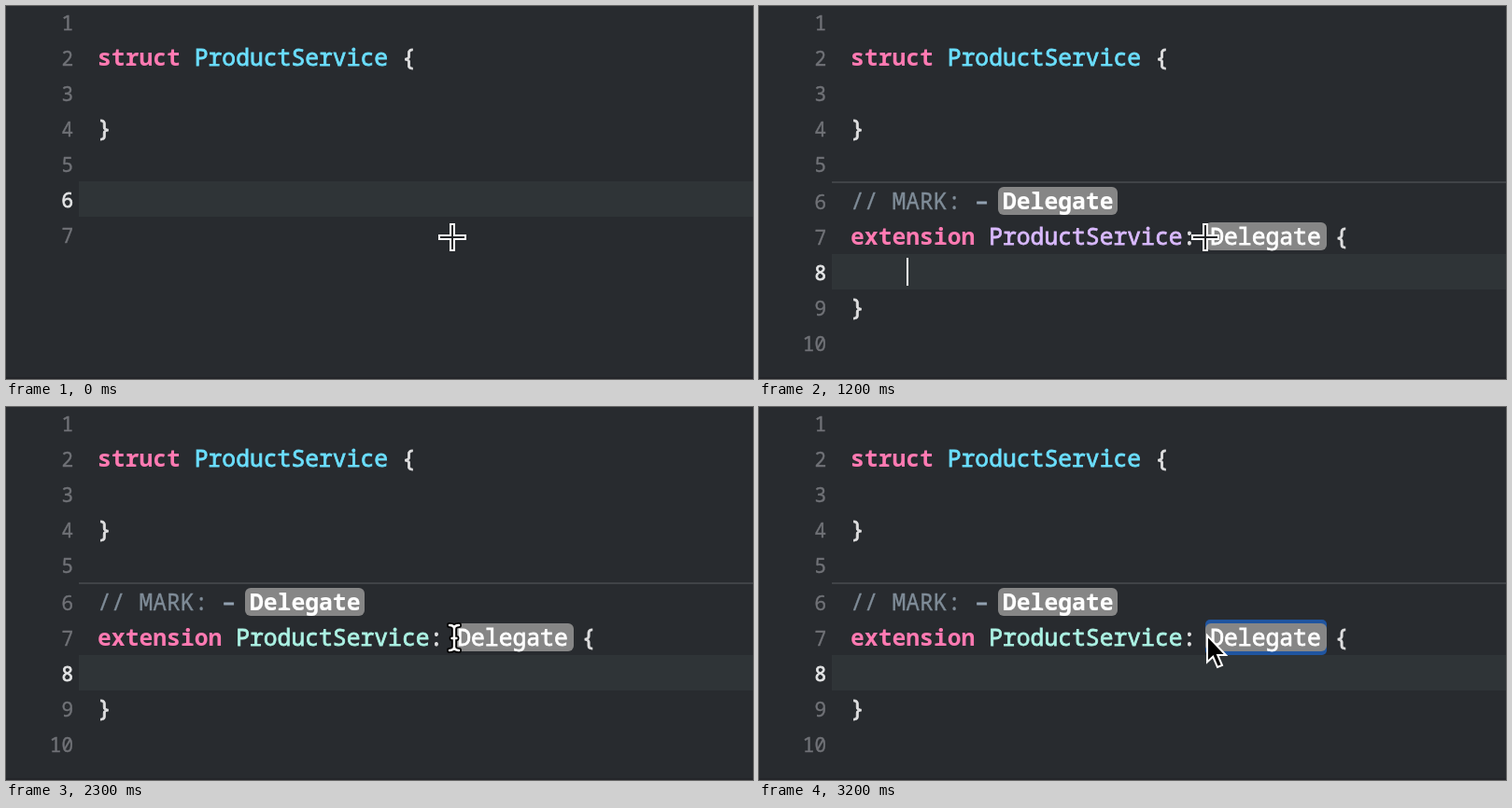
Animation of 800 by 400 pixels, one loop 3.3 s. Source, as an HTML page:

```html
<!DOCTYPE html>
<html lang="en">
<head>
<meta charset="utf-8">
<title>Code editor</title>
<style>
  html, body { margin: 0; width: 100%; height: 100%; overflow: hidden; background: #282b2f; }
  svg { display: block; width: 800px; height: 400px; }

  /* The thin stroke gives the regular face a medium weight. */
  text, tspan { fill: currentColor; stroke: currentColor; }
  text {
    font: 500 24.7px "Noto Sans Mono", "DejaVu Sans Mono", monospace;
    color: #dfdfe0; stroke-width: .8; white-space: pre;
  }
  .num text { font-size: 21px; color: #707277; stroke-width: .4; text-anchor: end; }
  .num .current { color: #e4e5e6; stroke-width: .8; }
  .key { color: #ff7ab2; font-weight: 700; stroke-width: 0; }
  .type { color: #6bdfff; }
  .note { color: #7f8c98; font-weight: 400; stroke-width: .3; }
  .mark { color: #92a1b1; stroke-width: 1; }
  .slot { fill: #868686; }
  .white { color: #fff; }
  .bold { font-weight: 700; stroke-width: .2; }
  .row { fill: #2f3437; }
  .caret { fill: #fff; }

  /* One loop is 3300 ms; every change is a hard cut. */
  .before, .after, .early, .late, .cross, .beam, .arrow, .ref {
    animation: 3300ms step-end infinite;
  }
  .before { animation-name: before; }
  .after { animation-name: after; }
  .early { animation-name: early; }
  .late { animation-name: late; }
  .cross { animation-name: cross; }
  .beam { animation-name: beam; }
  .arrow { animation-name: arrow; }
  .ref { animation-name: ref; }

  @keyframes before { 0% { opacity: 1 } 36.36%, 100% { opacity: 0 } }
  @keyframes after { 0% { opacity: 0 } 36.36%, 100% { opacity: 1 } }
  @keyframes early { 0% { opacity: 0 } 3.03% { opacity: 1 } 21.21%, 100% { opacity: 0 } }
  @keyframes late {
    0% { opacity: 0 } 36.36% { opacity: 1 } 54.54% { opacity: 0 }
    72.72% { opacity: 1 } 90.9%, 100% { opacity: 0 }
  }
  @keyframes cross { 0% { opacity: 1 } 39.39%, 100% { opacity: 0 } }
  @keyframes beam { 0% { opacity: 0 } 39.39% { opacity: 1 } 93.93%, 100% { opacity: 0 } }
  @keyframes arrow { 0% { opacity: 0 } 93.93%, 100% { opacity: 1 } }
  @keyframes ref { 0% { color: #dabaff } 45.45%, 100% { color: #acf2e4 } }
</style>
</head>
<body>
<svg viewBox="0 0 800 400">
  <defs>
    <path id="ibeam" d="M475 234Q480 234 480 238V257Q480 261 475 261M485 234Q480 234 480 238M480 257Q480 261 485 261M477.5 248H482.5"/>
  </defs>
  <rect width="800" height="400" fill="#282b2f"/>

  <g class="num">
    <text x="72" y="25.5">1</text>
    <text x="72" y="63.5">2</text>
    <text x="72" y="101.5">3</text>
    <text x="72" y="139.5">4</text>
    <text x="72" y="177.5">5</text>
  </g>
  <text x="98" y="64"><tspan class="key">struct</tspan> <tspan class="type">ProductService</tspan> {</text>
  <text x="98" y="139.5">}</text>

  <g class="before">
    <rect class="row" x="78" y="188" width="722" height="38"/>
    <g class="num">
      <text class="current" x="72" y="215.5">6</text>
      <text x="72" y="253.5">7</text>
    </g>
    <rect class="caret early" x="98" y="192" width="2" height="30"/>
  </g>

  <g class="after">
    <rect x="78" y="188" width="722" height="2" fill="#404347"/>
    <rect class="row" x="78" y="266" width="722" height="38"/>
    <g class="num">
      <text x="72" y="217.5">6</text>
      <text x="72" y="255.5">7</text>
      <text class="current" x="72" y="293.5">8</text>
      <text x="72" y="331.5">9</text>
      <text x="72" y="369.5">10</text>
    </g>

    <rect class="slot" x="256" y="194" width="128" height="30" rx="6"/>
    <text class="note" x="98" y="218">// MARK: <tspan class="mark">–</tspan> <tspan class="white bold">Delegate</tspan></text>

    <rect class="arrow" x="478" y="228" width="130" height="38" rx="5" fill="#2055a0"/>
    <rect class="slot" x="478" y="232" width="130" height="30" rx="6"/>
    <text x="98" y="256"><tspan class="key">extension</tspan> <tspan class="ref">ProductService</tspan>: <tspan class="white">Delegate</tspan> {</text>

    <rect class="caret late" x="158" y="270" width="2" height="30"/>
    <text x="98" y="331.5">}</text>
  </g>

  <rect y="398" width="800" height="2" fill="#242529"/>

  <g class="cross" fill="none">
    <path d="M463 248H493M478 233V263" stroke="#fff" stroke-width="6"/>
    <path d="M465 248H491M478 235V261" stroke="#222427" stroke-width="2"/>
  </g>

  <g class="beam" fill="none" stroke-linecap="round">
    <use href="#ibeam" stroke="#000" stroke-width="6"/>
    <use href="#ibeam" stroke="#fff" stroke-width="2.4"/>
  </g>

  <path class="arrow" d="M480 245V273.5L486.2 267.8L491 279L496 277L491.2 266H500Z" fill="#000" stroke="#fff" stroke-width="2"/>
</svg>
</body>
</html>
```
